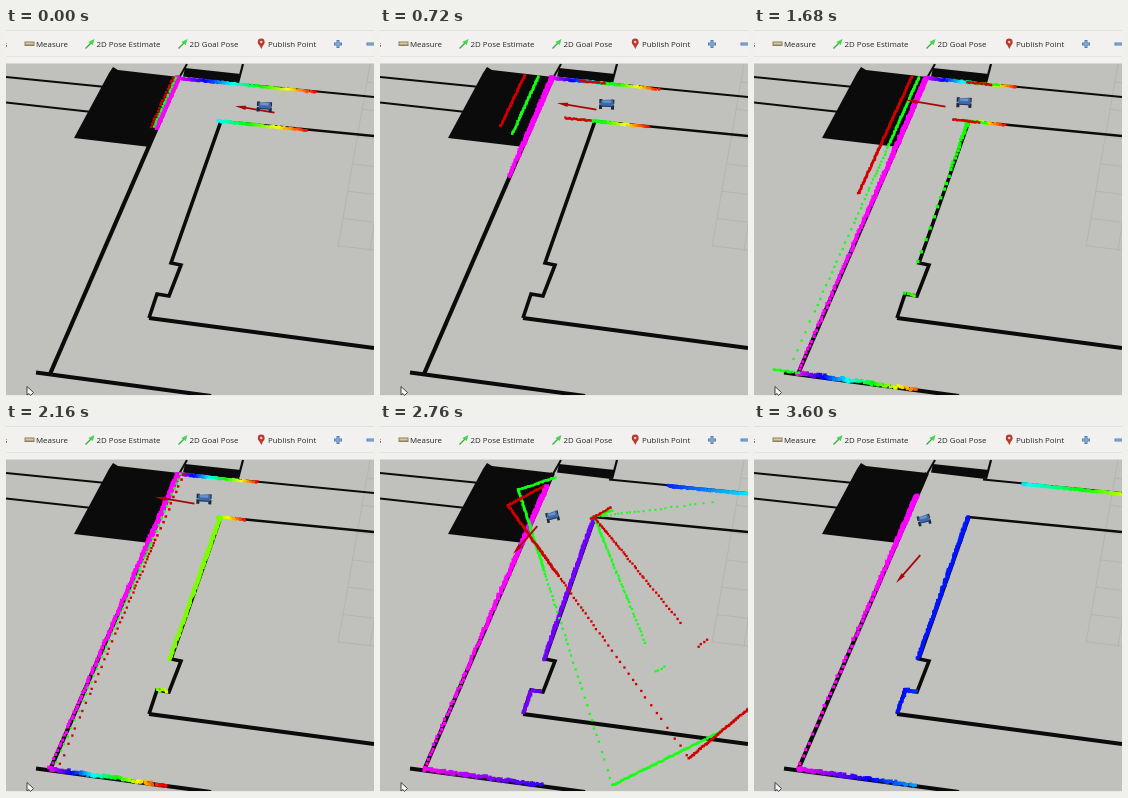
An HTML page with a canvas that plays this animation: 368x368 px, repeating every 3720 ms.

```html
<!DOCTYPE html>
<html lang="en">
<head>
<meta charset="utf-8">
<title>Robot localization</title>
<style>
html, body { margin: 0; width: 100%; height: 100%; overflow: hidden; background: #c0c0bd; }
canvas { display: block; width: 368px; height: 368px; }
</style>
</head>
<body>
<canvas id="view" width="368" height="368"></canvas>
<script>
const ctx = document.getElementById('view').getContext('2d');
const LOOP = 3720, STEP = 120, TURN = 2400;
const LIVE = { u: 0, v: 0, angle: 0 };
const PIVOT = { u: 55, v: 45 };

const lerp = (a, b, k) => a + (b - a) * k;
const clamp = k => Math.min(1, Math.max(0, k));
const ease = k => { k = clamp(k); return k * k * (3 - 2 * k); };
const rad = deg => deg * Math.PI / 180;

let seed = 1;
function rand() {
  seed = (seed * 16807) % 2147483647;
  return seed / 2147483647;
}

// Blend between [time, a, b] waypoints
function along(points, t) {
  let i = 0;
  while (i < points.length - 2 && t >= points[i + 1][0]) i++;
  const a = points[i], b = points[i + 1];
  const k = clamp((t - a[0]) / (b[0] - a[0]));
  return [lerp(a[1], b[1], k), lerp(a[2], b[2], k)];
}

// Floor plan to screen: u runs right, v runs down the left wall
function project(u, v) {
  const w = 1 - 0.000127 * u - 0.00109 * v;
  return [(172 + 0.978 * u - 0.526 * v) / w, (50 + 0.0962 * u + 0.724 * v) / w];
}

function place(pose, u, v) {
  const c = Math.cos(pose.angle), s = Math.sin(pose.angle);
  const du = u - PIVOT.u, dv = v - PIVOT.v;
  return project(PIVOT.u + du * c + dv * s + pose.u, PIVOT.v - du * s + dv * c + pose.v);
}

// Scatter points along a wall; size and gap are [start, end]
function hits(pose, color, [u0, v0, u1, v1], size, gap, jitter = 0.7) {
  const [x0, y0] = place(pose, u0, v0), [x1, y1] = place(pose, u1, v1);
  const len = Math.hypot(x1 - x0, y1 - y0);
  for (let d = 0; d <= len;) {
    const k = d / len, s = lerp(...size, k);
    const x = lerp(x0, x1, k) + (rand() - 0.5) * 2 * jitter;
    const y = lerp(y0, y1, k) + (rand() - 0.5) * 2 * jitter;
    ctx.fillStyle = color(lerp(u0, u1, k));
    ctx.fillRect(x - s / 2, y - s / 2, s, s);
    d += lerp(...gap, k) * (0.7 + rand() * 0.6);
  }
}

function robotAt(t) {
  return along([[0, 91, 23], [720, 61, 24], [1680, 45, 24], [2160, 34, 26], [2760, 17, 49], [3240, 16, 53]], t);
}

// How far down the left wall the scanner sees
const reach = t => t > 1050 ? 268 : 60 + Math.max(0, t) * 0.072;

function liveScan(t) {
  const turned = t >= TURN;
  const settle = ease((t - 2760) / 480);
  const span = turned ? lerp(500, 255, settle) : robotAt(t)[0] + 45;
  const rainbow = u => `hsl(${300 * clamp(1 - u / span)} 100% 50%)`;
  const wall = (seg, size, gap, jitter) => hits(LIVE, rainbow, seg, size, gap, jitter);

  const end = reach(t), near = Math.min(end, 70);
  wall([0, turned ? lerp(16, 27, settle) : 0, 0, near], [4.6, 4.2], [0.9, 1.1]);
  if (end > near) wall([0, near, 0, end], [4.2, 3], [1, t > 1050 ? lerp(4.5, 10, settle) : 1.2], 0.9);

  if (turned) {
    wall([lerp(115, 95, settle), 0, 240, 0], [3, 3], [1, 1.2]);
  } else {
    wall([0, 0, span, 0], [3, 2.6], [0.9, 1.8]);
    wall([PIVOT.u - 2, PIVOT.v, span, PIVOT.v], [3, 2.6], [0.9, 1.5]);
  }
  if (t > 1300) wall([0, 268, 84, 268], [3.5, 3.2], [1.1, 1.9], 1.4);
  if (t > 1400) wall([55, 45, 55, 182], [3.5, 3.3], [0.9, 1.1 + 14 * clamp((2160 - t) / 480)], 0.8);
  if (t > 1500) wall([54, 206, 62, 206], [3.2, 3.2], turned ? [1.5, 1.5] : [2.5, 2.5], 1);
  if (turned) wall([54, 222, 54, 206], [3.4, 3.4], [1.6, 1.6], 0.9);
}

// A late scan slides along the corridor, then swings while the robot turns
function lateScan(t, s) {
  if (t > s.until) return;
  const turned = t >= TURN;
  const swing = s.swing * Math.sin(Math.PI * clamp((t - TURN) / s.time));
  const pose = {
    u: turned ? 0 : -s.slide * Math.sin(Math.PI * (t + 120) / 2150),
    v: s.drop * ease((t - 2760) / 480),
    angle: rad(swing)
  };
  const wall = (seg, gap, size = 2.3, p = pose) => hits(p, () => s.color, seg, [size, size], gap, 0.5);

  const end = reach(t - s.delay), near = Math.min(end, 80);
  const top = turned ? -17 : 0;
  const first = pose.u > 0 ? 6 : t < 240 ? 2.5 : 1;
  wall([0, top, 0, near], [first, first * 1.2], 2.5);
  if (end > 200) wall([0, near, 0, end], [3, 11]);
  else if (end > near) wall([0, near, 0, end], [1, 1.3], 2.5);

  if (!turned) {
    if (t > 300 && t < 1900) for (const v of [0, PIVOT.v]) wall([55, v, 80, v], [1.3, 1.6]);
    if (end > 200 && t < 1900) wall([-10, 268, 8, 268], [2, 3], 2.6);
    return;
  }
  wall([0, top, 36, top], [1.1, 1.3], 2.4);
  wall([55, 45, 55, 182], [1.5, 4.5]);
  wall([54, 206, 63, 206], [3, 4]);
  wall([0, 268, 82, 268], [1.3, 1.5], 2.5);
  if (swing > 6) wall([52, 45, 74, 45], [1.3, 1.6]);
  if (swing > 6 && swing < 40) wall([56, 45, 168, 45], [3, 8], 2, { ...pose, angle: pose.angle / 2 });
  if (swing < 6) wall([100, 0, 240, 0], [1.2, 1.4]);
}

const late = [
  { color: '#14ff14', delay: 600, slide: 14.5, swing: 34, time: 840, drop: 8, until: 3300 },
  { color: '#cf0000', delay: 700, slide: 29, swing: 52, time: 1020, drop: 0, until: 3420 }
];

function path(pts) {
  ctx.beginPath();
  for (let i = 0; i < pts.length; i += 2) ctx.lineTo(pts[i], pts[i + 1]);
}

function line(color, width, ...pts) {
  path(pts);
  ctx.strokeStyle = color;
  ctx.lineWidth = width;
  ctx.stroke();
}

function fill(color, ...pts) {
  path(pts);
  ctx.fillStyle = color;
  ctx.fill();
}

function rect(color, x, y, w, h) {
  ctx.fillStyle = color;
  ctx.fillRect(x, y, w, h);
}

function disc(color, x, y, r) {
  ctx.beginPath();
  ctx.arc(x, y, r, 0, 7);
  ctx.fillStyle = color;
  ctx.fill();
}

function drawMap() {
  rect('#c0c0bd', 0, 35, 368, 333);
  const grid = '#b1b1ae';
  line(grid, 0.8, 364, 36, 332, 219);
  line(grid, 0.8, 368, 196, 364, 223);
  for (let y = 54; y < 225; y += 27.3) {
    const x = 364 - (y - 36) * 0.175;
    line(grid, 0.8, x, y, 368, y + (368 - x) * 0.12);
  }

  const ink = '#0b0b0b';
  fill(ink, 107, 39, 112, 42, 173, 49, 144, 119, 68, 110, 103, 45);
  fill(ink, 179, 40, 235, 46, 231, 55, 177, 48.5);
  line(ink, 2, 181, 36, 173, 50);
  line(ink, 2.2, 237, 36, 232, 55);
  line(ink, 2, 0, 49, 100, 59);
  line(ink, 2.2, 0, 74.5, 86, 84);
  line(ink, 2.2, 229, 55.5, 368, 69);
  line(ink, 2.4, 214, 93, 368, 108);
  line(ink, 3.6, 215, 93, 165, 235, 175, 237, 163, 268, 151, 266, 143, 290);
  line(ink, 4, 143, 290, 368, 320);
  line(ink, 4.2, 173, 49, 44, 346);
  line(ink, 4, 30, 344.5, 205, 368);
}

function drawRobot(t) {
  const turn = ease((t - 2160) / 600);
  ctx.save();
  ctx.translate(...project(...robotAt(t)));
  ctx.rotate(lerp(0.05, -0.25, turn));
  ctx.scale(lerp(1, 0.86, turn), 1);
  for (const x of [-7.5, 4.5]) for (const y of [-4.5, 1]) rect('#1b2638', x, y, 3, 4.5);
  fill('#3e69a8', -6, -3.5, 6, -4.5, 7, 1, 5, 3, -5, 3, -6, 0);
  fill('#6d95cb', -4, -3, 4, -3.5, 4, -1, -4, -1);
  line('#22385b', 1, -5, 2.5, 5, 2.5);
  ctx.restore();
}

function drawArrow(t) {
  const [x, y] = along([[0, 229, 78], [720, 177, 75], [1680, 152, 72], [2160, 149, 73], [2760, 133, 130], [3240, 142, 159]], t);
  const turn = ease((t - 2160) / 600);
  const len = lerp(40, 37, turn);
  ctx.save();
  ctx.translate(x, y);
  ctx.rotate(rad(lerp(9.5, -49, turn)));
  line('#a80808', 1.8, 10, 0, len, 0);
  fill('#a80808', 0, 0, 11, -2.2, 11, 2.2);
  ctx.restore();
}

function greenArrow(x) {
  line('#2fae3a', 1.3, x, 20.5, x + 6, 14.5);
  fill('#43d84d', x + 9, 11, x + 7.3, 17, x + 2.8, 14);
}

function bars(color, width, inset) {
  line(color, width, 328 + inset, 16, 336 - inset, 16);
  line(color, width, 332, 12 + inset, 332, 20 - inset);
  line(color, width, 360.5 + inset, 16, 368, 16);
}

function drawToolbar() {
  rect('#f2f1f0', 0, 0, 368, 35.5);
  rect('#e2e1df', 0, 2, 368, 1);
  rect('#e4e3e1', 0, 28, 368, 1);
  ctx.fillStyle = '#262626';
  ctx.font = '7.9px "Open Sans", "Noto Sans", sans-serif';
  const labels = { 's': -2.5, 'Measure': 30, '2D Pose Estimate': 90.5, '2D Goal Pose': 183.5, 'Publish Point': 262 };
  for (const text in labels) ctx.fillText(text, labels[text], 19);

  rect('#8d8061', 18.5, 13.5, 10, 4.5);
  rect('#d8c99a', 19.5, 14.5, 8, 2);
  greenArrow(79.5);
  greenArrow(172.5);
  fill('#b83b2c', 252, 14.5, 258.5, 14.5, 255.3, 21);
  disc('#b83b2c', 255.2, 14, 3.4);
  disc('#f0d6cf', 255.2, 14, 1.2);
  bars('#527fae', 3, 0);
  bars('#8eb5dd', 1.2, 1);
}

function drawCursor() {
  const shape = [21, 358.5, 21, 367, 23, 365.5, 24.5, 367.5, 27.5, 364.5, 21, 358.5];
  fill('#f4f4f4', ...shape);
  line('#333', 0.9, ...shape);
}

function draw(now) {
  const t = Math.floor((now % LOOP) / STEP) * STEP;
  seed = 1 + t * 31;
  drawMap();
  liveScan(t);
  late.forEach(s => lateScan(t, s));
  drawArrow(t);
  drawRobot(t);
  rect('#e9e9e7', 0, 367, 368, 1);
  drawCursor();
  drawToolbar();
}

const start = performance.now();
function tick() {
  draw(performance.now() - start);
  requestAnimationFrame(tick);
}
tick();
</script>
</body>
</html>
```
